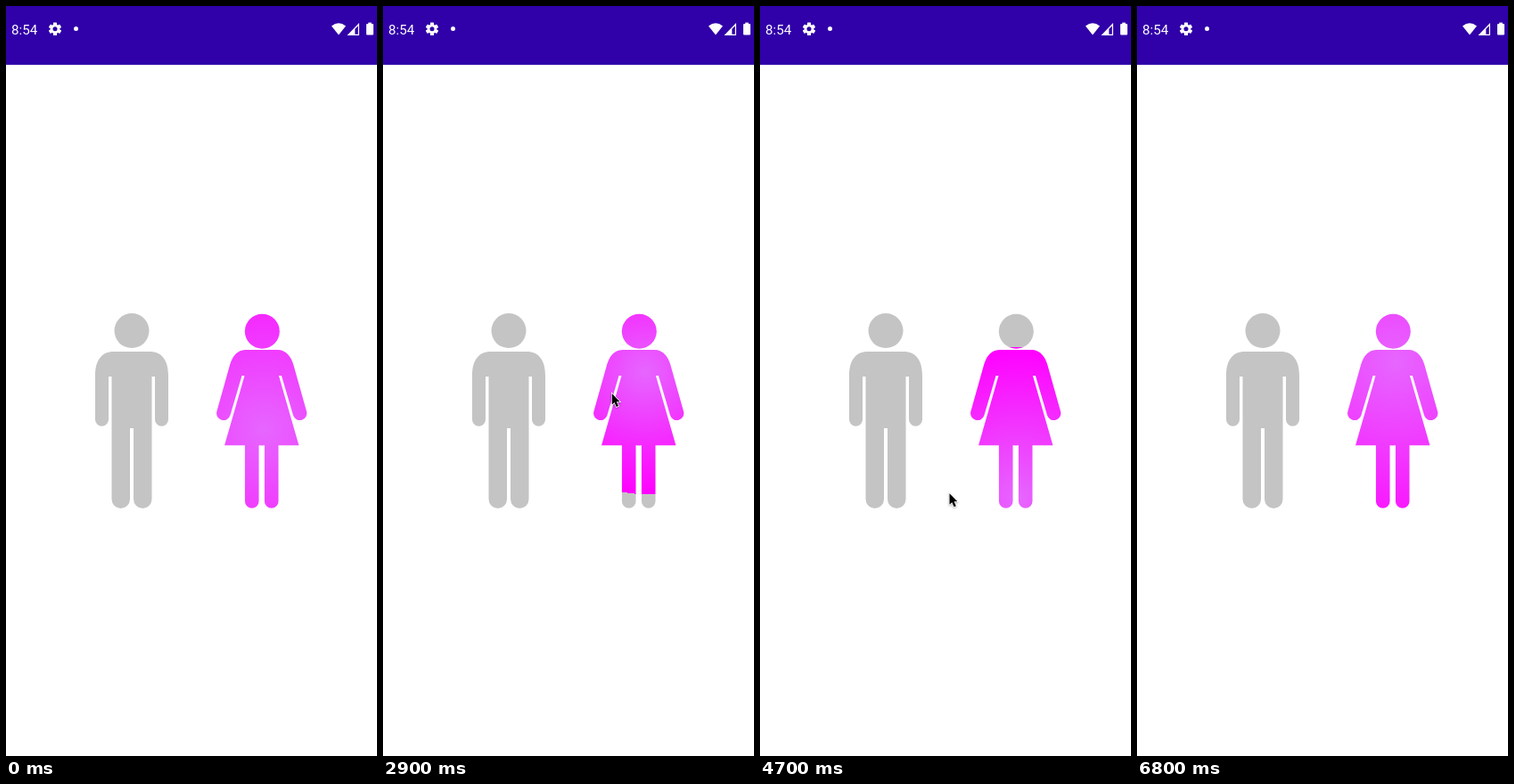
An HTML page that plays this animation: 416 by 842 pixels, repeating every 7.2 s.

```html
<!DOCTYPE html>
<html lang="en">
<head>
<meta charset="utf-8">
<title>Gender picker</title>
<style>
  html, body { margin: 0; width: 100%; height: 100%; overflow: hidden; background: #fff; }
  svg { display: block; width: 416px; height: 842px; }
  text { font: 15.2px Roboto, sans-serif; }
  #cursor { filter: drop-shadow(0 1px 1px rgba(0, 0, 0, .3)); }
</style>
</head>
<body>
<svg viewBox="0 0 416 842">
  <defs>
    <radialGradient id="male" gradientUnits="userSpaceOnUse">
      <stop offset="0" stop-color="#5f5fff"/>
      <stop offset="1" stop-color="#00f"/>
      <stop offset="1" stop-color="#c4c4c4"/>
    </radialGradient>
    <radialGradient id="female" gradientUnits="userSpaceOnUse">
      <stop offset="0" stop-color="#e666ff"/>
      <stop offset="1" stop-color="#f0f"/>
      <stop offset="1" stop-color="#c4c4c4"/>
    </radialGradient>

    <!-- Each figure is its left half plus a mirrored copy. -->
    <mask id="man" maskUnits="userSpaceOnUse" x="0" y="300" width="416" height="300" fill="#fff">
      <circle cx="141" cy="364.6" r="19.5"/>
      <path id="manHalf" d="M142 388H121C107 388 100 398 100 415V464.3a7.5 7.5 0 0 0 15 0V416H118.5
        V553.7a10.25 10.25 0 0 0 20.5 0V474H142Z"/>
      <use href="#manHalf" transform="matrix(-1 0 0 1 282 0)"/>
    </mask>
    <mask id="woman" maskUnits="userSpaceOnUse" x="0" y="300" width="416" height="300" fill="#fff">
      <circle cx="287.3" cy="365.2" r="19.5"/>
      <path id="womanHalf" d="M288 386H269C259 386 253.5 394 251 403L236.4 455a7.8 7.8 0 0 0 15 4.5
        L264.5 415H267.5L245 493.2H267.9V556a7.8 7.8 0 0 0 15.6 0V493.2H288Z"/>
      <use href="#womanHalf" transform="matrix(-1 0 0 1 573.4 0)"/>
    </mask>
    <rect id="tooth" x="-2" y="-7.2" width="4" height="14.4" rx=".6"/>
  </defs>

  <!-- Status bar -->
  <rect width="416" height="66" fill="#3000a8"/>
  <g fill="#fff">
    <text x="6" y="32">8:54</text>
    <g transform="translate(55 25.8)">
      <use href="#tooth"/>
      <use href="#tooth" transform="rotate(60)"/>
      <use href="#tooth" transform="rotate(120)"/>
      <circle r="5.4"/>
      <circle r="2.5" fill="#3000a8"/>
    </g>
    <circle cx="78.5" cy="25.6" r="2.5"/>
    <path d="M373 32.5L365 22.4Q373 16 381 22.4Z"/>
    <path d="M396 19V33H382.5Z"/>
    <path d="M391.3 25.8L394.8 22.2V31.7H391.3Z" fill="#3000a8"/>
    <rect x="404" y="20" width="8" height="12.6" rx="1"/>
    <rect x="406.2" y="18.6" width="3.6" height="2"/>
  </g>

  <rect y="300" width="208" height="300" fill="url(#male)" mask="url(#man)"/>
  <rect x="208" y="300" width="208" height="300" fill="url(#female)" mask="url(#woman)"/>

  <path id="cursor" d="M.5 1V13.5L3.300 11L5.500 16L7.800 15L5.600 10.100H9.300Z"
    stroke="#fff" stroke-width="1.500" paint-order="stroke"/>
</svg>
<script>
const LOOP = 7200, STEP = 100, GROW = 500, FULL_RADIUS = 219;
const START_CENTER = { x: 290, y: 476 }, CURSOR_GONE = 6600;
const get = id => document.getElementById(id);

// The cursor enters, hovers, then taps the male and female figures in turn.
const stop = (time, x, y) => ({ time, x, y });
const stops = [
  stop(600, -1, 465), stop(1050, 99, 416),
  stop(1640, 119, 416), stop(2697, 294, 411), stop(3550, 153, 497),
  stop(4450, 291, 553), stop(5184, 118, 538), stop(5855, 290, 400)
];
const taps = stops.slice(2);

const clamp = v => Math.min(1, Math.max(0, v));
const mix = (a, b, k) => a + (b - a) * k;

// Eased progress along the cubic Bézier (0.4, 0, 0.2, 1).
function ease(x) {
  if (x >= 1) return 1;
  let low = 0, high = 1;
  for (let i = 0; i < 20; i++) {
    const s = (low + high) / 2, r = 1 - s;
    if (1.2 * r * r * s + 0.6 * r * s * s + s * s * s < x) low = s; else high = s;
  }
  return low * low * (3 - 2 * low);
}

function setGlow(id, center, radius) {
  const gradient = get(id);
  gradient.setAttribute('cx', center.x);
  gradient.setAttribute('cy', center.y);
  gradient.setAttribute('r', radius);
}

// Both circles share the tap point: one grows while the other shrinks.
function drawFigures(t) {
  const index = taps.findLastIndex(tap => tap.time <= t);
  const tap = taps[index];
  const grown = tap ? FULL_RADIUS * ease((t - tap.time) / GROW) : FULL_RADIUS;
  const [selected, other] = index % 2 === 0 ? ['male', 'female'] : ['female', 'male'];
  setGlow(selected, tap || START_CENTER, grown);
  setGlow(other, tap || START_CENTER, FULL_RADIUS - grown);
}

// The cursor rests briefly at a stop, then travels and waits at the next one.
function drawCursor(t) {
  const index = stops.findLastIndex(s => s.time <= t);
  const visible = index >= 0 && t < CURSOR_GONE;
  get('cursor').style.display = visible ? '' : 'none';
  if (!visible) return;
  const from = stops[index], to = stops[index + 1] || from;
  const rest = 90, arrival = 0.6 * (to.time - from.time);
  const k = clamp((t - from.time - rest) / (arrival - rest));
  get('cursor').setAttribute('transform',
    `translate(${mix(from.x, to.x, k)} ${mix(from.y, to.y, k)})`);
}

const startTime = performance.now();
function frame() {
  const elapsed = (performance.now() - startTime) % LOOP;
  const t = Math.floor(elapsed / STEP) * STEP;
  drawFigures(t);
  drawCursor(t);
  requestAnimationFrame(frame);
}
frame();
</script>
</body>
</html>
```
